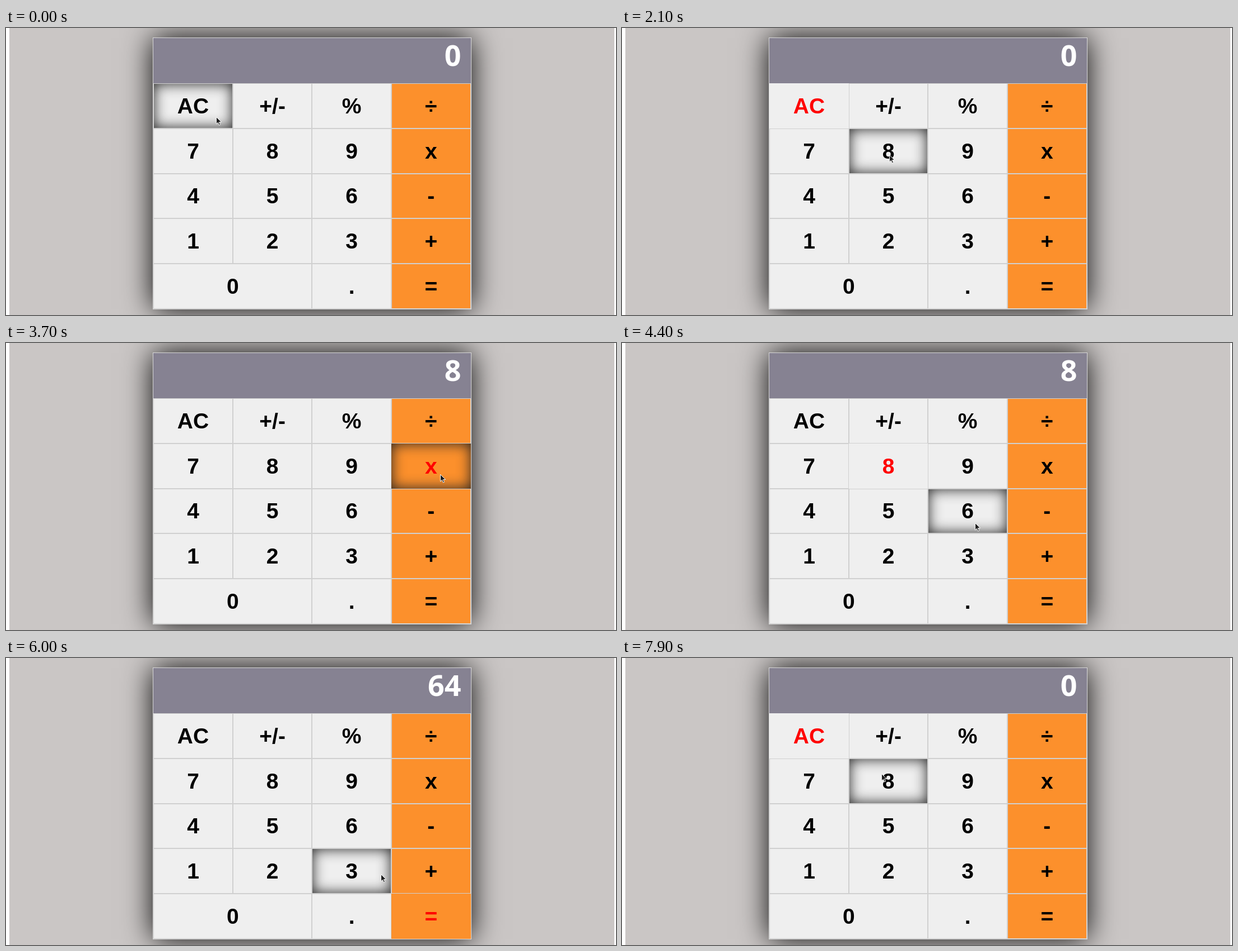
An HTML page that plays this animation: 1089x514 px, repeating every 8000 ms.

```html
<!DOCTYPE html>
<html lang="en">
<head>
<meta charset="utf-8">
<title>Calculator</title>
<style>
  * { box-sizing: border-box; }
  html, body { margin: 0; width: 100%; height: 100%; overflow: hidden; background: #fff; }
  #stage { position: relative; width: 1089px; height: 514px; overflow: hidden; }
  #page { position: absolute; left: 6px; top: 0; width: 1080px; height: 514px; background: #cac6c5; }
  #calc {
    position: absolute; left: 263.2px; top: 18px;
    display: grid; grid-template: 81px repeat(5, 80.8px) / repeat(4, 141.6px);
    background: #efefef; box-shadow: 0 0 0 1px #d8d8d8, 0 0 50px #000;
  }
  #display { grid-column: span 4; position: relative; background: #868292; }
  #value {
    position: absolute; right: 17px; top: 3px; color: #fff;
    font: bold 52px/53px "Noto Sans", "Open Sans", sans-serif;
  }
  .key {
    display: flex; align-items: center; justify-content: center;
    background: #efefef; border: 1px solid #d0d0d0; color: #000;
    font: bold 39px/45px "Liberation Sans", Arial, sans-serif;
  }
  .op { background: #fc902c; }
  .wide { grid-column: span 2; }
  .hover { box-shadow: inset 0 0 25px #222; }
  .focus { border: 0; color: #f00; }
  #cursor { position: absolute; left: 0; top: 0; width: 14px; height: 20px; overflow: visible; }
</style>
</head>
<body>
<div id="stage">
  <div id="page"></div>
  <div id="calc"><div id="display"><span id="value">0</span></div></div>
  <svg id="cursor" viewBox="0 0 14 20">
    <path d="M.5 .5V13L3.4 10.3L5.4 15L7.5 14.1L5.5 9.5H9.6Z"
          fill="#1c1c1c" stroke="#f4f4f4" stroke-width="1" stroke-linejoin="round"/>
  </svg>
</div>
<script>
const LOOP = 8000, TICK = 100;
const START = { x: 375, y: 159 };

// each move rests at its end until the next one leaves
const moves = [
  { leave: 0, arrive: 100, x: 364, y: 158 },
  { leave: 900, arrive: 1300, x: 517, y: 239 },
  { leave: 1400, arrive: 1500, x: 477, y: 227 },
  { leave: 2600, arrive: 3000, x: 848, y: 272 },
  { leave: 3000, arrive: 3400, x: 775, y: 235 },
  { leave: 3700, arrive: 4100, x: 500, y: 230 },
  { leave: 4200, arrive: 4400, x: 630, y: 322 },
  { leave: 4400, arrive: 4800, x: 840, y: 500 },
  { leave: 4800, arrive: 5000, x: 790, y: 471 },
  { leave: 5700, arrive: 6600, x: 322, y: 147 },
  { leave: 7300, arrive: 7900, x: 463, y: 207 }
];
const presses = [[300, "AC"], [2600, "8"], [3600, "x"], [4200, "8"], [5300, "="], [7200, "AC"]];

const calc = document.getElementById("calc");
const value = document.getElementById("value");
const cursor = document.getElementById("cursor");

const keys = "AC +/- % ÷ 7 8 9 x 4 5 6 - 1 2 3 + 0 . =".split(" ").map(label => {
  const el = document.createElement("div");
  el.className = "key";
  el.classList.toggle("op", "÷x-+=".includes(label));
  el.classList.toggle("wide", label === "0");
  el.textContent = label;
  calc.append(el);
  return { label, el };
});
for (const key of keys) key.box = key.el.getBoundingClientRect();

const pressedBy = t => presses.filter(([at]) => at <= t).map(([, label]) => label);

function pointer(t) {
  let { x, y } = START;
  for (const m of moves) {
    const p = Math.min(1, Math.max(0, (t - m.leave) / (m.arrive - m.leave)));
    const ease = p * p * (3 - 2 * p);
    x += (m.x - x) * ease;
    y += (m.y - y) * ease;
  }
  return [Math.round(x), Math.round(y)];
}

// digits replace the shown number; "x" stores it as a factor
function result(labels) {
  let shown = 0, factor = 1;
  for (const label of labels) {
    if (label === "AC") [shown, factor] = [0, 1];
    else if (label === "x") factor = shown;
    else if (label === "=") shown *= factor;
    else shown = Number(label);
  }
  return shown;
}

function draw() {
  const t = Math.floor(performance.now() % LOOP / TICK) * TICK;
  const [x, y] = pointer(t);
  const focused = pressedBy(t).pop();
  for (const { label, el, box } of keys) {
    el.classList.toggle("hover", x >= box.left && x < box.right && y >= box.top && y < box.bottom);
    el.classList.toggle("focus", label === focused);
  }
  // the key takes focus on press, the display follows on release
  value.textContent = result(pressedBy(t - TICK));
  cursor.style.transform = `translate(${x}px, ${y}px)`;
  requestAnimationFrame(draw);
}
draw();
</script>
</body>
</html>
```
